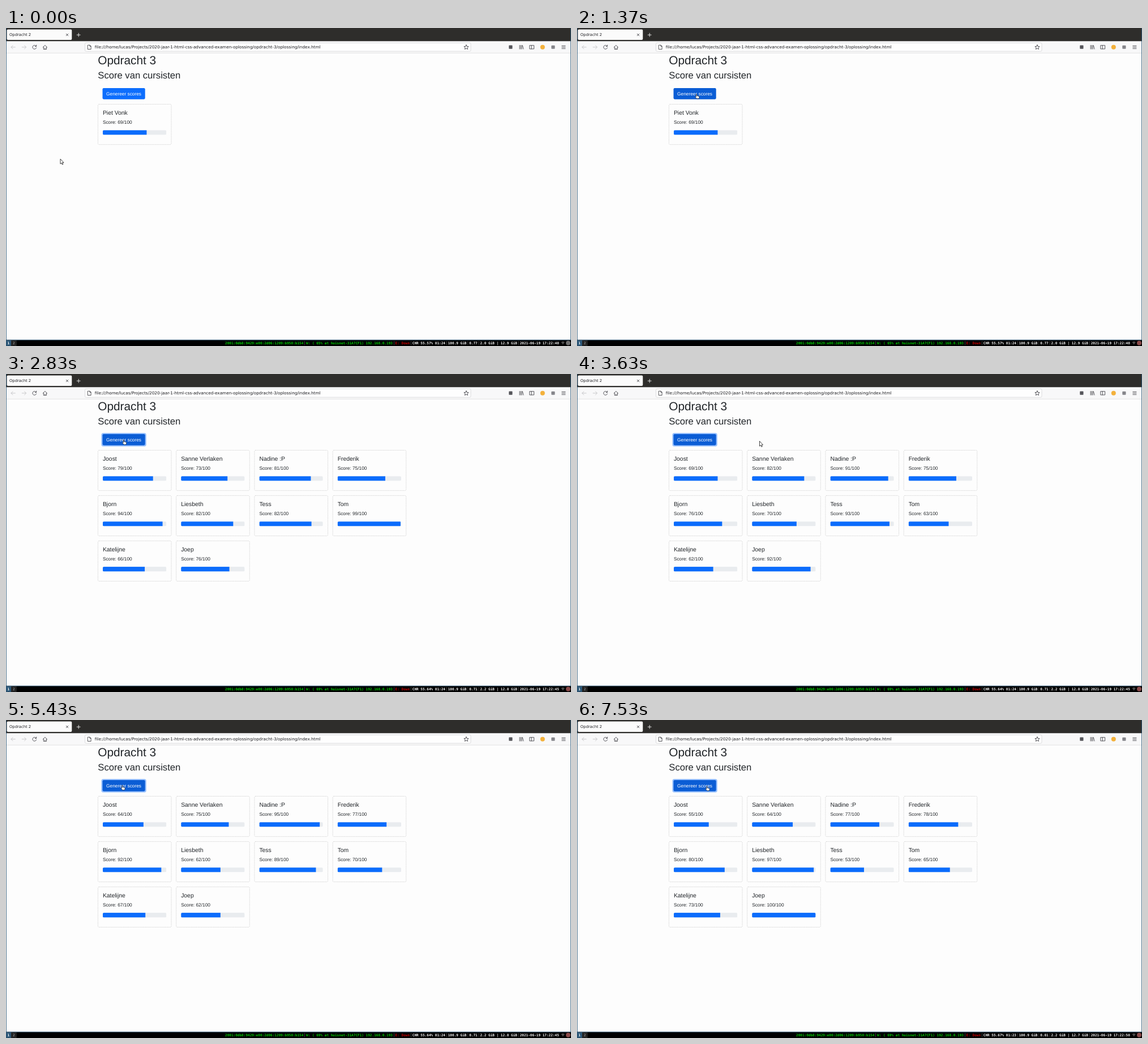
An HTML page for the animation above (8.23 s loop, 998 px wide and 561 px high).

```html
<!DOCTYPE html>
<html lang="nl">
<head>
<meta charset="utf-8">
<title>Opdracht 2</title>
<style>
  html, body { margin: 0; width: 100%; height: 100%; overflow: hidden; background: #fdfdfd; }
  svg { display: block; width: 998px; height: 561px; }
  text { white-space: pre; text-rendering: geometricPrecision; }
  .page { font-family: "Liberation Sans", Arial, sans-serif; fill: #212529; }
  .chrome { font-family: "DejaVu Sans", sans-serif; fill: #1c1c20; }
  .status { font: bold 6.05px "DejaVu Sans Mono", monospace; }
  .icon { fill: none; stroke: #45454a; stroke-width: .9; stroke-linecap: round; stroke-linejoin: round; }
</style>
</head>
<body>
<svg id="stage" viewBox="0 0 998 561"></svg>
<script>
const LOOP = 8230;
const stage = document.getElementById('stage');

function add(parent, tag, attrs, content) {
  const node = document.createElementNS('http://www.w3.org/2000/svg', tag);
  for (const key in attrs) node.setAttribute(key, attrs[key]);
  if (content !== undefined) node.textContent = content;
  return parent.appendChild(node);
}
const rect = (parent, x, y, width, height, fill, more) =>
  add(parent, 'rect', { x, y, width, height, fill, ...more });
const label = (parent, x, y, size, content, cls = 'page', more) =>
  add(parent, 'text', { x, y, 'font-size': size, class: cls, ...more }, content);
const icon = (d, more) => add(stage, 'path', { d, class: 'icon', ...more });
const show = (node, on) => node.setAttribute('visibility', on ? 'inherit' : 'hidden');

// Browser window
function drawBrowser() {
  rect(stage, 0, 0, 998, 561, '#fdfdfd');
  rect(stage, 0, 0, 998, 23.5, '#2e2d2b');
  rect(stage, 1.5, 2.5, 114.8, 18.5, '#fbfbfb', { rx: 2 });
  label(stage, 6, 14.4, 6.8, 'Opdracht 2', 'chrome');
  icon('M106.3 10.2l3.6 3.6m0-3.6l-3.6 3.6', { 'stroke-width': .7 });
  icon('M125.2 12.2h6m-3-3v6', { style: 'stroke:#f2f2f2' });

  rect(stage, 0, 23.5, 998, 20.6, '#f8f8f9');
  rect(stage, 0, 43.8, 998, .6, '#cfcfd2');
  rect(stage, 139.5, 26.3, 681.5, 14.8, '#fefefe', { rx: 2, stroke: '#c8c8cc', 'stroke-width': .6 });
  icon('M16.3 33.8H9m3-3l-3 3 3 3', { style: 'stroke:#c4c4c7' });
  icon('M28.3 33.8h7.3m-3-3l3 3-3 3', { style: 'stroke:#c4c4c7' });
  icon('M53.2 32a3.4 3.4 0 1 0 .4 2.8M53.7 30v2.4h-2.4');
  icon('M65.2 34l3.7-3.6 3.7 3.6M66.3 33.5v4h5.2v-4M68.9 37.3v-2');
  icon('M144.6 30.2h3.5l2 2v5.3h-5.5zM148 30.3v2h2');
  label(stage, 156.8, 36.4, 7.27,
    'file:///home/lucas/Projects/2020-jaar-1-html-css-advanced-examen-oplossing/opdracht-3/oplossing/index.html', 'chrome');
  icon('M813 29.7l1.2 2.7 2.9.3-2.2 1.9.7 2.9-2.6-1.5-2.6 1.5.7-2.9-2.2-1.9 2.9-.3z', { 'stroke-width': .75 });

  rect(stage, 888.3, 30.6, 6.2, 6.2, '#55555a', { rx: .8 });
  icon('M907.2 30.5v6.6m2-6.6v6.6m2-6.6v6.6m1.2-6.3l1.6 6.3');
  icon('M925.2 30.7h7.4v6.2h-7.4zM928.2 30.7v6.2');
  add(stage, 'circle', { cx: 947.8, cy: 33.8, r: 4, fill: '#f3b13c' });
  rect(stage, 963.3, 30.8, 6.2, 6, '#85858a', { rx: 1 });
  icon('M981.8 31.3h6.2m-6.2 2.5h6.2m-6.2 2.5h6.2', { 'stroke-width': .8 });

  rect(stage, 0, 0, .8, 551, '#285577');
  rect(stage, 997.2, 0, .8, 551, '#285577');
  rect(stage, 0, 549.8, 998, 1, '#285577');
}

// Desktop status bar
const ADVANCE = 3.64, GAP = 4.7;
const readings = [
  { from: 0, wifi: 65, battery: '55.57% 01:24', load: '0.77', memory: '2.0 GiB | 12.9 GiB', second: 40 },
  { from: 1400, wifi: 69, battery: '55.64% 01:24', load: '0.71', memory: '2.2 GiB | 12.8 GiB', second: 45 },
  { from: 6200, wifi: 69, battery: '55.67% 01:23', load: '0.81', memory: '2.2 GiB | 12.7 GiB', second: 50 }
];
const segments = r => [
  '2001:0db8:9429:e00:2d06:1209:b950:b154',
  `W: ( ${r.wifi}% at huisnet-31A7CF1) 192.168.0.193`,
  'E: Down', `CHR ${r.battery}`, '100.9 GiB', r.load, r.memory,
  `2021-06-19 17:22:${r.second}`
];
const segmentColors = ['#00c800', '#00c800', '#c00000'];
let statusTexts, recorder;

function drawStatusBar() {
  rect(stage, 0, 550.8, 998, 10.2, '#000');
  rect(stage, .3, 551.3, 8.6, 9.2, '#285577', { stroke: '#4c7899', 'stroke-width': .5 });
  rect(stage, 9.6, 551.3, 8.6, 9.2, '#222', { stroke: '#333', 'stroke-width': .5 });
  label(stage, 2.6, 557.8, 6.05, '1', 'status', { fill: '#fff' });
  label(stage, 11.9, 557.8, 6.05, '2', 'status', { fill: '#888' });
  let x = 387;
  statusTexts = segments(readings[0]).map((content, i) => {
    if (i) rect(stage, x - GAP / 2 - .2, 552.3, .5, 7, '#777');
    const node = label(stage, x, 557.7, 6.05, content, 'status', { fill: segmentColors[i] || '#f4f4f4' });
    x += content.length * ADVANCE + GAP;
    return node;
  });
  add(stage, 'path', { d: 'M980.6 554.2q3.1-2.6 6.2 0l-3.1 4.4z', fill: '#4c4c4c' });
  recorder = add(stage, 'circle', { cx: 993, cy: 555.7, r: 4 });
}

// Page content
const students = ['Joost', 'Sanne Verlaken', 'Nadine :P', 'Frederik', 'Bjorn',
  'Liesbeth', 'Tess', 'Tom', 'Katelijne', 'Joep'];
const rounds = [
  { at: 1900, scores: [79, 73, 81, 75, 94, 82, 82, 99, 66, 76] },
  { at: 2950, scores: [69, 82, 91, 75, 76, 70, 93, 63, 62, 92] },
  { at: 4500, scores: [64, 75, 95, 77, 92, 62, 89, 70, 67, 62] },
  { at: 5600, scores: [91, 60, 93, 92, 82, 95, 97, 55, 94, 71] },
  { at: 7300, scores: [55, 64, 77, 78, 80, 97, 53, 65, 73, 100] }
];
const firstRound = { at: 0, scores: [69] };
const BAR = 112.4;

function makeCard(i) {
  const x = 162.4 + (i % 4) * 138.25, y = 134.5 + Math.floor(i / 4) * 79.95;
  const group = add(stage, 'g', { transform: `translate(${x} ${y})` });
  rect(group, 0, 0, 129.6, 71.1, 'none',
    { rx: 2, stroke: '#c3c3c3', 'stroke-width': .65, 'stroke-dasharray': '1.6 1' });
  const name = label(group, 8.5, 18.3, 10.4, students[i]);
  const score = label(group, 8.5, 34.3, 8.32, '');
  const clip = add(group, 'clipPath', { id: 'bar' + i });
  rect(clip, 8.5, 45.7, BAR, 8.4, '#000', { rx: 2.08 });
  const bar = add(group, 'g', { 'clip-path': `url(#bar${i})` });
  rect(bar, 8.5, 45.7, BAR, 8.4, '#e9ecef');
  const fill = rect(bar, 8.5, 45.7, 0, 8.4, '#0b6cfc');
  return { group, name, score, fill };
}

let button, ring, cards;
function drawPage() {
  label(stage, 162.3, 64.3, 20.8, 'Opdracht 3');
  label(stage, 162.3, 89.4, 16.64, 'Score van cursisten');
  ring = rect(stage, 168.4, 104, 79.4, 23.8, '#98c1fe', { rx: 3.6 });
  button = rect(stage, 170.5, 106.1, 75.2, 19.6, '#0d6efd', { rx: 2.08 });
  label(stage, 177.1, 118.8, 8.32, 'Genereer scores', 'page', { style: 'fill:#fff' });
  cards = students.map((_, i) => makeCard(i));
}

// Mouse pointer: time, x, y
const path = [
  [0, 96, 231], [530, 96, 231], [870, 197, 158], [1100, 206, 126], [1470, 212, 114.8],
  [1990, 212, 114.8], [2350, 330, 122], [2800, 208, 116], [3080, 208, 116],
  [3630, 322.5, 118.5], [4200, 206, 115], [4560, 206, 115], [4900, 280, 118],
  [5200, 280, 118], [5430, 205.5, 115], [5700, 205.5, 115], [6250, 276, 115.5],
  [6370, 274, 115.5], [7150, 229.5, 116.3], [LOOP, 229.5, 116.3]
];
const slope = (i, axis) => i < 0 || i >= path.length - 1 ? 0 :
  (path[i + 1][axis] - path[i][axis]) / (path[i + 1][0] - path[i][0]);
function tangent(i, axis) {
  const a = slope(i - 1, axis), b = slope(i, axis);
  return a * b <= 0 ? 0 : Math.abs(a) < Math.abs(b) ? a : b;
}
function pointerAt(t) {
  let i = 0;
  while (i < path.length - 2 && t >= path[i + 1][0]) i++;
  const span = path[i + 1][0] - path[i][0], u = (t - path[i][0]) / span, v = 1 - u;
  return [1, 2].map(axis =>
    path[i][axis] * (1 + 2 * u) * v * v + path[i + 1][axis] * u * u * (3 - 2 * u) +
    span * u * v * (tangent(i, axis) * v - tangent(i + 1, axis) * u));
}

let pointer, shapes;
function drawPointer() {
  pointer = add(stage, 'g', { 'stroke-linejoin': 'round' });
  const shape = (d, fill, stroke, width) => add(pointer, 'path', { d, fill, stroke, 'stroke-width': width });
  shapes = {
    arrow: shape('M0 0V8.8L2 7 3.4 10 4.8 9.4 3.5 6.5H6Z', '#fff', '#222', .85),
    hand: shape('M-.6 .6Q0-.3.6.6V3.4L4 4.2Q4.9 4.5 4.7 5.7L4 8.4H.1L-2.3 5.2Q-2.2 4-.6 5Z', '#fff', '#222', .7),
    beam: shape('M-2-4Q-.4-4 0-3.4 .4-4 2-4M0-3.4V3.4M-2 4Q-.4 4 0 3.4 .4 4 2 4', 'none', '#222', .95)
  };
}
function pointerKind(x, y) {
  if (x > 170 && x < 246 && y > 106 && y < 126) return 'hand';
  if (x > 171 && x < 224 && y > 143 && y < 172) return 'beam';
  return 'arrow';
}

const ramp = (t, start, duration = 150) => Math.max(0, Math.min(1, (t - start) / duration));
const latest = (list, key, t) => list.filter(item => t >= item[key]).pop();

function render(t) {
  const [x, y] = pointerAt(t);
  pointer.setAttribute('transform', `translate(${x} ${y})`);
  const kind = pointerKind(x, y);
  for (const key in shapes) show(shapes[key], key === kind);

  const dark = ramp(t, 1110);
  button.setAttribute('fill', `rgb(${13 - 2 * dark},${110 - 17 * dark},${253 - 40 * dark})`);
  ring.setAttribute('opacity', ramp(t, 1840));

  const round = latest(rounds, 'at', t) || firstRound;
  cards.forEach((card, i) => {
    const score = round.scores[i];
    show(card.group, score !== undefined);
    if (score === undefined) return;
    card.name.textContent = round === firstRound ? 'Piet Vonk' : students[i];
    card.score.textContent = `Score: ${score}/100`;
    card.fill.setAttribute('width', BAR * score / 100);
  });

  segments(latest(readings, 'from', t)).forEach((content, i) => { statusTexts[i].textContent = content; });
  recorder.setAttribute('fill', t < 60 ? '#6c6c6c' : '#8a4a4a');
}

drawBrowser();
drawPage();
drawStatusBar();
drawPointer();

function tick() {
  render(performance.now() % LOOP);
  requestAnimationFrame(tick);
}
tick();
</script>
</body>
</html>
```
